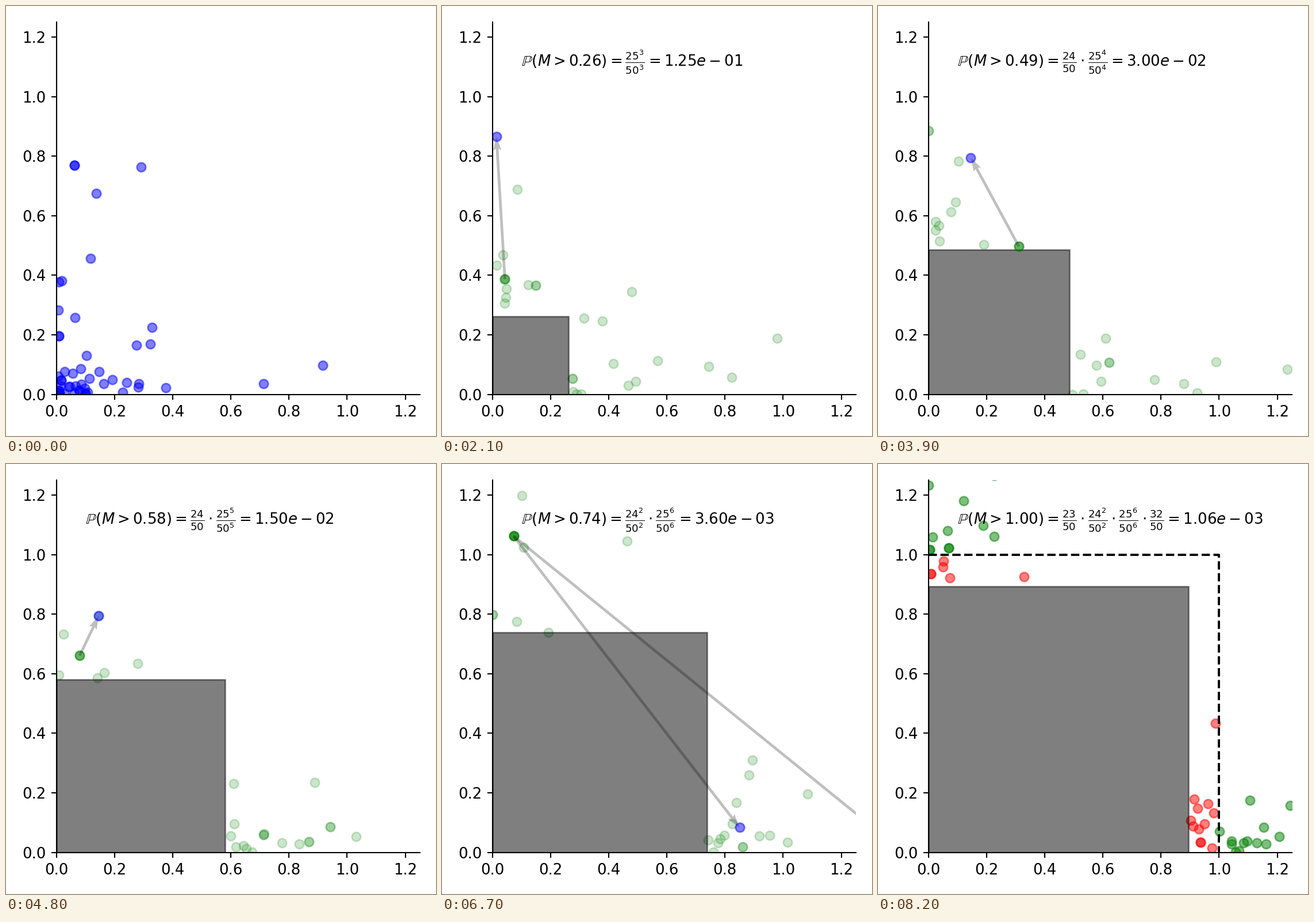
Recreate the animation shown at these times as a matplotlib script. Size 748 by 748 pixels, loop 8300 ms.

```python
import numpy as np
import matplotlib.pyplot as plt
from matplotlib.animation import FuncAnimation
from matplotlib.patches import Rectangle

N = 50
STEPS = 9  # pictures per level
FRAMES = 83
LEVELS = [0.1235, 0.2027, 0.2625, 0.356, 0.4856, 0.58, 0.6747, 0.739, 0.8935, 1.0]
COUNTS = [25, 25, 25, 25, 24, 25, 25, 24, 23, 32]

# A few far points of each cloud; the rest is random
KEYS = [
    [(.291, .763), (.117, .456), (.712, .037), (.328, .225)],
    [(.028, .671), (.534, .240), (.104, .766), (.712, .037)],
    [(.112, .252), (.086, .689), (.378, .247)],
    [(.014, .866), (.049, .749), (.798, .225), (.628, .146)],
    [(.311, .497), (.989, .109)],
    [(.146, .795)],
    [(.146, .795), (.050, 1.150), (1.021, .139)],
    [(.073, 1.062), (.883, .261)],
    [(1.36, .044), (.850, .084)],
    [(.227, 1.061), (.988, .434), (.329, .926)],
]
# Which survivors move first at a level
SOURCES = {1: (0, 1, 1), 4: (0,), 6: (0,), 7: (0, 0)}

rng = np.random.default_rng(4)


def spread(n, low, high=None):
    """Random points whose larger coordinate lies above low (and below high)."""
    if high is None:
        big = low + rng.exponential(0.17, n)
    else:
        big = rng.uniform(low, high, n)
    small = rng.exponential(0.09, n) % big
    tall = rng.random(n) < 0.4
    p = np.column_stack([np.where(tall, small, big), np.where(tall, big, small)])
    twins = n // 8
    p[n - twins:] = p[:twins]
    return p


def make_cloud(k):
    keys = np.array(KEYS[k])
    kept = np.sum(keys.max(axis=1) > LEVELS[k])
    floor = LEVELS[k - 1] if k else 0
    alive = spread(COUNTS[k] - kept, LEVELS[k])
    dead = spread(N - len(keys) - len(alive), floor, LEVELS[k])
    return np.vstack([keys, alive, dead])


clouds = [make_cloud(k) for k in range(len(LEVELS))]


def split(k):
    above = clouds[k].max(axis=1) > LEVELS[k]
    return clouds[k][above], clouds[k][~above]


def plan_moves(k, n=6):
    first = SOURCES.get(k, ())
    picks = [*first, *rng.integers(COUNTS[k], size=n - len(first))]
    return list(zip(split(k)[0][picks], clouds[k + 1][:n]))


moves = [plan_moves(k) for k in range(len(LEVELS) - 1)]


def fraction(count, power=1):
    up = f"^{power}" if power > 1 else ""
    return rf"\frac{{{count}{up}}}{{{N}{up}}}"


def formula(k):
    counts = COUNTS[:k + 1]
    if k < 2:
        terms = [fraction(c) for c in counts]
    else:
        terms = [fraction(c, counts.count(c)) for c in sorted(set(counts))]
    value = np.prod(np.array(counts) / N)
    return (rf"$\mathbb{{P}}(M>{LEVELS[k]:.2f})=" + r"\cdot".join(terms)
            + f"={value:.2e}$")


fig, ax = plt.subplots(figsize=(4, 4), dpi=187)
ticks = np.arange(0, 1.3, 0.2)
ax.set(xlim=(0, 1.25), ylim=(0, 1.25), xticks=ticks, yticks=ticks)
ax.spines[["top", "right"]].set_visible(False)
fig.tight_layout()

drawn = []


def dots(p, color, alpha=0.5):
    x, y = np.atleast_2d(p).T
    drawn.append(ax.scatter(x, y, color=color, alpha=alpha))


def box(level):
    drawn.append(ax.add_patch(Rectangle((0, 0), level, level, color="k", alpha=0.5)))


def arrow(start, end):
    drawn.append(ax.quiver(*start, *(end - start), color="k", alpha=0.25,
                           angles="xy", scale_units="xy", scale=1))


def draw(i):
    while drawn:
        drawn.pop().remove()
    if i == 0:
        dots(clouds[0], "b")
        return
    k, step = divmod(i - 1, STEPS)
    level = LEVELS[k]
    alive, dead = split(k)
    drawn.append(ax.text(0.1, 1.1, formula(k)))
    if step == 0:
        dots(alive, "g")
        dots(dead, "r")
        if k:
            box(LEVELS[k - 1])
        drawn.extend(ax.plot([0, level, level], [level, level, 0], "k--"))
    elif step == 1:
        dots(alive, "g")
        box(level)
    elif step == STEPS - 1:
        dots(clouds[k + 1], "b")
        box(level)
    else:
        dots(alive, "g", 0.2)
        box(level)
        for start, end in moves[k][:step - 1]:
            dots(start, "g")
            arrow(start, end)
            dots(end, "b")


anim = FuncAnimation(fig, draw, frames=FRAMES, interval=100, repeat=True)
plt.show()
```
